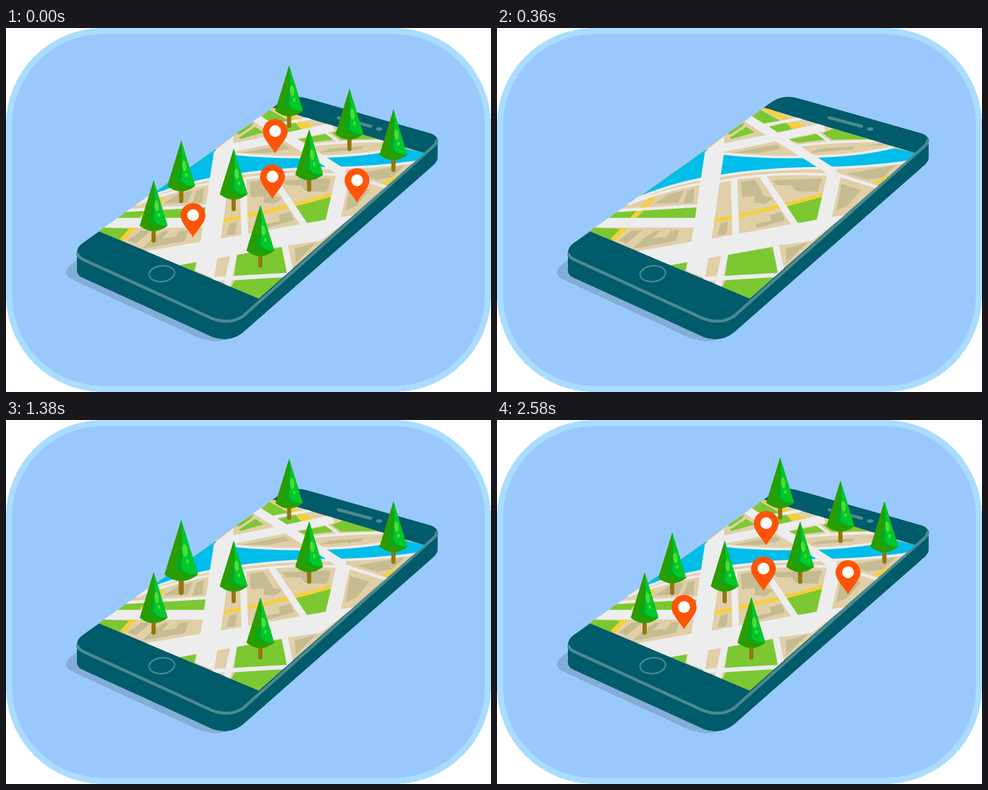
An HTML page for the animation above (5.01 s loop, 800 by 600 pixels).

```html
<!DOCTYPE html>
<html lang="en">
<head>
<meta charset="utf-8">
<title>Map on a phone</title>
<style>
html, body { margin: 0; width: 100%; height: 100%; overflow: hidden; background: #fff; }
svg { display: block; width: 100vw; height: 100vh; }
.line { fill: none; stroke: #4b8a91; stroke-linecap: round; }
.road { fill: none; stroke: #ededed; }
.green { fill: #7bc832; }
.block { fill: #c5bc92; }
.yellow { fill: none; stroke: #f4d03c; }
</style>
</head>
<body>
<svg viewBox="0 0 800 600">
  <defs>
    <clipPath id="screen"><path d="M440 131L690 206L417 446L153 335Z"/></clipPath>
    <g id="tree">
      <path d="M0 -24V-3.5" stroke="#94760c" stroke-width="7" stroke-linecap="round"/>
      <path d="M0 -103L23 -28Q0 -10 -23 -28Z" fill="#2a9d00"/>
      <path d="M0 -103L22.5 -29Q5 -22 -9 -38Q0 -58 0 -103Z" fill="#0aa81f"/>
      <path d="M0 -103L22.5 -29Q9 -26 0 -38Q4 -62 0 -103Z" fill="#00c82c"/>
      <ellipse cx="5" cy="-61" rx="3.6" ry="9" transform="rotate(-6 5 -61)" fill="#4fdc34"/>
      <ellipse cx="8.5" cy="-46" rx="2" ry="3.2" fill="#4fdc34"/>
    </g>
    <g id="pin">
      <path d="M0 0C-6 -11 -20.5 -24 -20.5 -36A20.5 20.5 0 0 1 20.5 -36C20.5 -24 6 -11 0 0Z" fill="#ff5408"/>
      <circle cy="-36.5" r="9.7" fill="#fff"/>
    </g>
  </defs>

  <rect width="800" height="600" rx="160" fill="#a9dcff" shape-rendering="crispEdges"/>
  <rect x="10" y="10" width="780" height="580" rx="150" fill="#99c9fc"/>

  <path id="shadow" fill="#83add6" d="M99 403Q99 395 112 386L440 155Q460 140 480 147L685 205Q696 209 696 217Q696 222 688 229L378 507Q352 523 318 511L110 415Q99 410 99 403Z"/>

  <g id="phone">
    <path fill="#005b6a" d="M117 370Q117 360 130 352L453 122Q472 109 497 116L698 173Q712 177 712 186V214Q712 220 704 227L393 500Q372 519 342 510L125 411Q117 407 117 400Z"/>
    <path class="line" stroke-width="5" stroke-linecap="butt" d="M118.500 373Q120 378 126 381L338 478Q368 490 391 475L707 193Q710 190 710.500 185"/>
    <ellipse class="line" stroke-width="2.500" cx="257" cy="405" rx="21" ry="13" transform="rotate(-6 257 405)"/>
    <path class="line" stroke-width="5" d="M548 148L601.500 162"/>
    <ellipse cx="615.500" cy="166.500" rx="5.500" ry="3" fill="#4b8a91"/>

    <g clip-path="url(#screen)">
      <path fill="#e1cfa8" d="M440 131L690 206L417 446L153 335Z"/>
      <path fill="#00bdea" d="M225 285L345 200L372 208Q450 215 520 214Q600 212 655 198L700 208L665 222Q600 230 530 229Q440 232 368 243Q290 254 225 285Z"/>
      <path class="block" d="M388 206L461 192L468 199L432 206ZM516 206L532 199L590 195L586 200ZM597 194L648 190L630 194ZM578 240L658 226L637 246L612 250ZM568 257L600 267L578 293L560 301ZM259 290L285 273L308 268L299 288ZM314 268L326 264L324 288L307 289ZM402 254L425 250L441 277L456 280L442 290L425 288V277L404 279ZM454 251L536 248L529 270L494 269L486 259L462 259ZM369 322L381 319L378 340L363 342ZM450 308L469 303L475 317L428 330L427 323L452 318ZM201 350L222 334L240 333L214 355ZM243 346L262 334H270L257 347L280 344L286 334L301 333L295 351L224 364ZM476 364L513 353L496 369L478 388Z"/>
      <path class="green" d="M419 148L435 135L467 153L436 161ZM446 164L478 155L493 166L463 172ZM380 173L409 155L404 163L384 176ZM384 181L411 163L425 172L387 183ZM481 184L530 174L540 184L497 189ZM537 173L556 166L616 183L552 184ZM198 303L330 295L328 314H183ZM150 335L160 329L206 331L190 350ZM474 292L537 277L527 317L494 323ZM285 391L314 386L310 402ZM381 374L456 361L463 405L376 410ZM377 416L458 410L417 448L371 428Z"/>
      <path fill="#f4d03c" d="M435 133L449 132L508 163L487 167L474 153Z"/>
      <path class="yellow" stroke-width="8" d="M258 280L235 302L191 350"/>
      <path class="yellow" stroke-width="6" d="M357 318Q450 300 540 274M618 261L650 243"/>
      <path class="road" stroke-width="4" d="M372 207Q450 215 520 212Q600 210 655 196M222 285Q290 254 368 244Q440 232 530 231Q600 231 675 221M215 291Q300 258 372 252Q460 236 550 242M497 194Q560 186 640 186M527 172L549 188"/>
      <path class="road" stroke-width="5" d="M430 162L503 149M562 242L630 263M195 301L332 293"/>
      <path class="road" stroke-width="7" d="M340 414L465 407"/>
      <path class="road" stroke-width="11" d="M391 250L394 345M438 244L493 326M376 372L364 428M459 355L470 408"/>
      <path class="road" stroke-width="14" d="M360 200L465 179L540 163M410 147L558 240"/>
      <path class="road" stroke-width="16" d="M150 321H330"/>
      <path class="road" stroke-width="23" d="M557 238L538 322"/>
      <path fill="#ededed" d="M343 204L375 178L374 209L369 243L354 348L343 412L312 400L322 345L336 250ZM225 369L322 352L355 347L488 323L527 316L551 312L575 308L519 351L460 359L380 374L368 376L275 393Z"/>
    </g>
  </g>
  <g id="items"></g>
</svg>
<script>
const LOOP = 5010, STEP = 30;
const $ = id => document.getElementById(id);

// x, y of the foot of each piece, in order of appearance
const trees = [[375.5, 302], [500, 270], [639, 237], [243.5, 354], [419.5, 395], [467, 164.5], [289, 288.5], [566.5, 203]];
const pins = [[439.5, 281.5], [579, 287.5], [444, 206.5], [308.5, 345]];

const elastic = (t, period) => t <= 0 ? 0 : t >= 1 ? 1 :
  1 - 2 ** (-10 * t) * Math.cos(2 * Math.PI * t / period);

function bounce(t) {
  if (t <= 0) return 0;
  if (t >= 1) return 1;
  const s = t * 2.75;
  if (s < 1) return s * s;
  if (s < 2) return (s - 1.5) ** 2 + 0.75;
  if (s < 2.5) return (s - 2.25) ** 2 + 0.9375;
  return (s - 2.625) ** 2 + 0.984375;
}

function add(kind, [x, y], start, period) {
  const el = $(kind).cloneNode(true);
  el.removeAttribute("id");
  $("items").append(el);
  return { el, x, y, start, period };
}

// A zero scale may stop later repaints, so empty shapes are hidden instead.
function place(el, x, y, size, rest = "") {
  el.style.display = size > 0 ? "" : "none";
  if (size > 0) el.setAttribute("transform", `translate(${x} ${y}) scale(${size}) ${rest}`);
}

const items = [
  ...trees.map((p, i) => add("tree", p, 537 + 120 * i, 0.5)),
  ...pins.map((p, i) => add("pin", p, 1630 + 169 * i, 0.3))
];

function draw(time) {
  const t = time < STEP ? LOOP : time;
  const fall = bounce((t - 30) / 330);
  $("phone").setAttribute("transform", `translate(0 ${-344 * (1 - fall)})`);
  place($("shadow"), 407, 301, fall, "translate(-407 -301)");
  for (const { el, x, y, start, period } of items)
    place(el, x, y, elastic((t - start) / 600, period));
}

const begin = performance.now();
function tick() {
  const time = (performance.now() - begin) % LOOP;
  draw(Math.floor(time / STEP) * STEP);
  requestAnimationFrame(tick);
}
tick();
</script>
</body>
</html>
```
